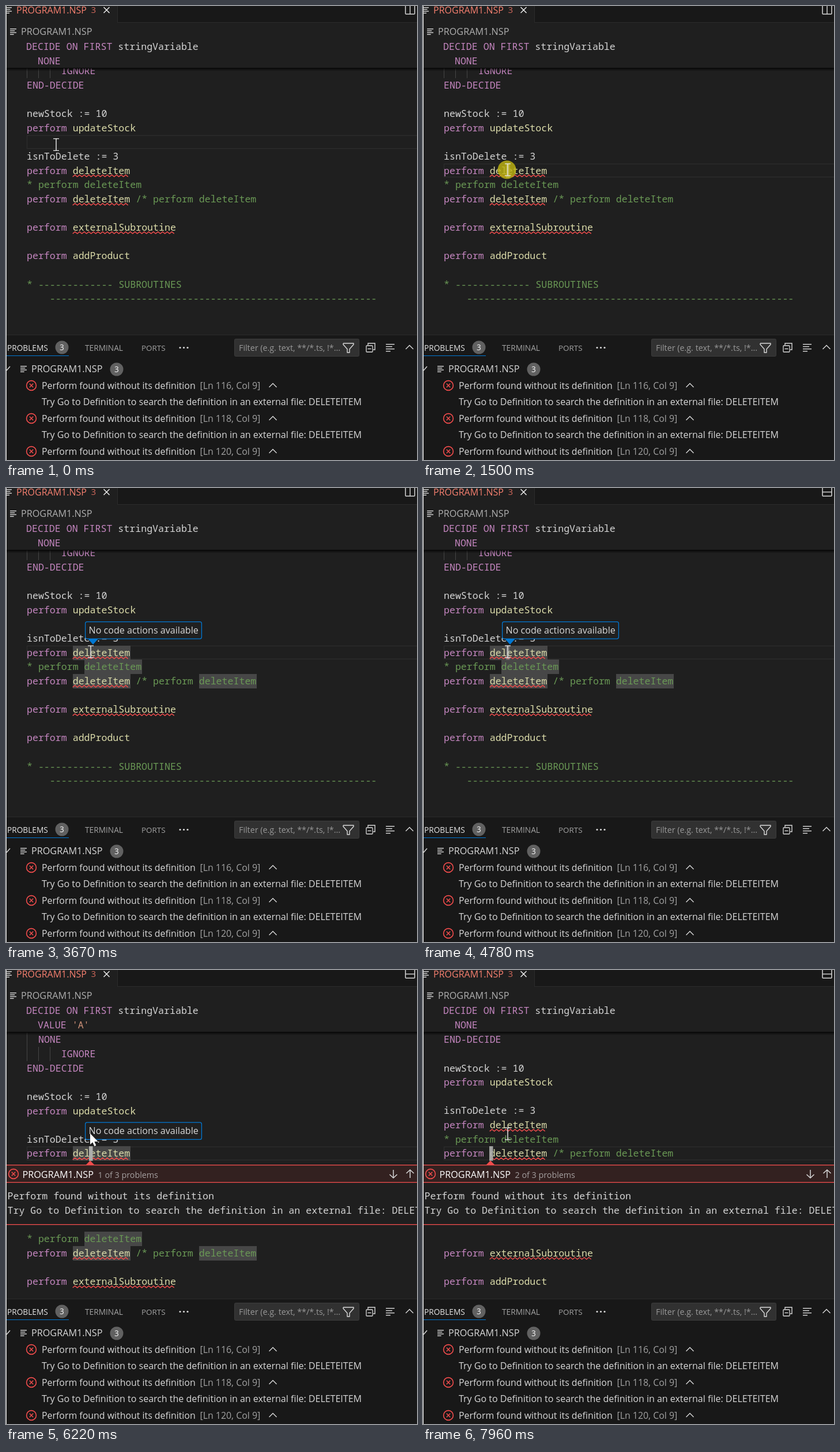
Write an HTML page with a canvas that moves like this. It is 713 px wide and 786 px high and loops after 8000 ms.

```html
<!DOCTYPE html>
<html lang="en">
<head>
<meta charset="utf-8">
<title>Editor quick fix</title>
<style>
  html, body { margin: 0; width: 100%; height: 100%; overflow: hidden; background: #181818; }
  canvas { display: block; }
</style>
</head>
<body>
<canvas id="stage" width="713" height="786"></canvas>
<script>
const ctx = document.getElementById('stage').getContext('2d');
const LOOP = 8000, PITCH = 24.63, CHAR = 9.96, LEFT = 36;
const CLICK = 1430, MARK = 1710, TIP = 2830, ICON = 4710, PEEK = 4850, NEXT = 7300;
const RED = '#f14c4c', GREY = '#d8d8d8', DIM = '#a2a2a2', BLUE = '#0078d4', EDITOR = '#1f1f1f';
const INK = { k: '#c586c0', f: '#dcdcaa', c: '#6a9955', w: '#d4d4d4', s: '#ce9178' };

// Each token starts with its colour key.
const LINES = {
  108: 'w  |kNONE',
  109: 'w      |kIGNORE',
  110: 'kEND-DECIDE',
  112: 'wnewStock := 10',
  113: 'kperform |fupdateStock',
  115: 'wisnToDelete := 3',
  116: 'kperform |fdeleteItem',
  117: 'c* perform deleteItem',
  118: 'kperform |fdeleteItem|c /* perform deleteItem',
  120: 'kperform |fexternalSubroutine',
  122: 'kperform |faddProduct',
  124: 'c* ' + '-'.repeat(13) + ' SUBROUTINES',
  125: 'c    ' + '-'.repeat(57)
};
const WORDS = [[116, 8], [117, 10], [118, 8], [118, 30]];
const ERRORS = [[116, 10], [118, 10], [120, 18]];

const clamp = v => Math.max(0, Math.min(1, v));
const smooth = v => { v = clamp(v); return v * v * (3 - 2 * v); };
const colX = n => LEFT + n * CHAR;

function rect(x, y, w, h, color) {
  ctx.fillStyle = color;
  ctx.fillRect(x, y, w, h);
}
function path(points, color, width = 1.4) {
  ctx.beginPath();
  for (let i = 0; i < points.length; i += 2) ctx.lineTo(points[i], points[i + 1]);
  ctx.strokeStyle = color;
  ctx.lineWidth = width;
  ctx.stroke();
}
function shape(points, color) {
  ctx.beginPath();
  for (let i = 0; i < points.length; i += 2) ctx.lineTo(points[i], points[i + 1]);
  ctx.closePath();
  ctx.fillStyle = color;
  ctx.fill();
}
function disc(x, y, r, color) {
  ctx.beginPath();
  ctx.arc(x, y, r, 0, 7);
  ctx.fillStyle = color;
  ctx.fill();
}
function box(x, y, w, h, r, fill, stroke, width = 1.3) {
  ctx.beginPath();
  ctx.roundRect(x, y, w, h, r);
  if (fill) { ctx.fillStyle = fill; ctx.fill(); }
  ctx.strokeStyle = stroke;
  ctx.lineWidth = width;
  ctx.stroke();
}
function label(s, x, y, color = GREY, size = 15.9) {
  ctx.font = `${size}px "Open Sans", "Noto Sans", sans-serif`;
  ctx.fillStyle = color;
  ctx.fillText(s, x, y + size * 0.35);
}
function code(line, x, y) {
  ctx.font = '500 16.6px "Noto Sans Mono", "DejaVu Sans Mono", monospace';
  for (const token of line.split('|')) {
    ctx.fillStyle = INK[token[0]];
    ctx.fillText(token.slice(1), x, y + 5.6);
    x += (token.length - 1) * CHAR;
  }
}

function listIcon(x, y, w) {
  [w, w * 0.75, w, w * 0.6].forEach((len, i) => rect(x, y - 5 + i * 3.2, len, 1.4, GREY));
}
function errorIcon(x, y) {
  ctx.beginPath();
  ctx.arc(x, y, 8.4, 0, 7);
  ctx.strokeStyle = RED;
  ctx.lineWidth = 1.6;
  ctx.stroke();
  cross(x, y, 3.2, RED);
}
function cross(x, y, r, color) {
  path([x - r, y - r, x + r, y + r], color, 1.5);
  path([x - r, y + r, x + r, y - r], color, 1.5);
}
function badge(x, y) {
  disc(x, y, 11.5, '#616161');
  label('3', x - 4, y, '#f8f8f8', 13.6);
}
const chevron = (x, y) => path([x - 6.5, y + 3, x, y - 3.5, x + 6.5, y + 3], GREY);
function arrow(x, y, dir) {
  path([x, y - 7 * dir, x, y + 7 * dir], GREY, 1.5);
  path([x - 6.5, y + dir, x, y + 7 * dir, x + 6.5, y + dir], GREY, 1.5);
}
function squiggle(x, y, len) {
  const pts = [];
  for (let i = 0; i * 4 <= len; i++) pts.push(x + i * 4, y + (i % 2 ? -1.6 : 1.6));
  path(pts, RED, 1.4);
}

function header(t) {
  rect(1, 0, 712, 108, EDITOR);
  rect(193, 0, 520, 28, '#181818');
  rect(193, 0, 1, 28, '#2b2b2b');
  rect(193, 28, 520, 1, '#2b2b2b');
  listIcon(0, 7, 10);
  label('PROGRAM1.NSP', 18, 7, '#f88070', 16);
  label('3', 147.5, 7, '#d2695c', 15);
  cross(174.5, 7, 5, '#f0f0f0');
  box(693, -2, 16, 16, 1, null, GREY, 1.5);
  if (t < ICON) path([701, 0, 701, 14], GREY);
  else path([693, 7, 709, 7], GREY);
  listIcon(7, 44, 11);
  label('PROGRAM1.NSP', 26, 44, '#b0b0b0', 16.2);

  code('kDECIDE ON FIRST |wstringVariable', 35, 70.5);
  code(t >= PEEK && t < NEXT ? "w  |kVALUE |s'A'" : 'w  |kNONE', 35, 95.5);
  const shade = ctx.createLinearGradient(0, 107, 0, 113);
  shade.addColorStop(0, '#000c');
  shade.addColorStop(1, '#0000');
  rect(1, 107, 712, 6, shade);
}

function panel() {
  rect(1, 569, 712, 217, '#181818');
  rect(1, 569, 712, 1, '#2b2b2b');
  label('PROBLEMS', 2, 592, '#e4e4e4', 13.7);
  rect(1, 605, 108, 1, BLUE);
  badge(97, 591);
  label('TERMINAL', 137, 592, DIM, 13.7);
  label('PORTS', 235, 592, DIM, 13.4);
  for (const x of [302, 308.5, 315]) disc(x, 591.5, 1.6, GREY);

  box(396.5, 576.5, 216, 30, 2, '#313131', '#3c3c3c', 1);
  label('Filter (e.g. text, **/*.ts, !*...', 404, 592, '#989898', 14.3);
  ctx.lineJoin = 'round';
  path([585, 584, 603, 584, 603, 586, 596, 594, 596, 600, 592, 600, 592, 594, 585, 586, 585, 584], GREY);
  ctx.lineJoin = 'miter';
  box(625, 588, 11, 11, 1, null, GREY);
  path([628, 587, 628, 584, 640, 584, 640, 595, 637, 595], GREY);
  path([627.5, 593.5, 633.5, 593.5], GREY);
  [15, 11, 15, 8].forEach((w, i) => rect(659, 585 + i * 4, w, 1.4, GREY));
  chevron(700, 591);

  path([1, 631, 7, 624], GREY);
  listIcon(25, 628, 11);
  label('PROGRAM1.NSP', 44, 628, GREY, 16.2);
  badge(192, 629);
  [116, 118, 120].forEach((n, i) => {
    const y = 657 + i * 57;
    errorIcon(44, y);
    label('Perform found without its definition', 62, y);
    label(`[Ln ${n}, Col 9]`, 336.5, y, DIM);
    chevron(463, y);
    label('Try Go to Definition to search the definition in an external file: DELETEITEM', 62, y + 28.5, GREY, 16);
  });
}

function peekView(index, x) {
  shape([x - 8, 338, x, 330, x + 8, 338], RED);
  rect(1, 337, 712, 104, EDITOR);
  rect(1, 338, 712, 30, '#332120');
  for (const y of [337, 367, 440]) rect(1, y, 712, 1.3, RED);
  errorIcon(13, 353);
  label('PROGRAM1.NSP', 28.5, 354, '#ffffff', 16.2);
  label(`${index} of 3 problems`, 159.5, 354.5, '#a5a0a0', 14.3);
  arrow(672, 353, 1);
  arrow(701, 353, -1);
  code('wPerform found without its definition', 2.5, 391);
  code('wTry Go to Definition to search the definition in an external file: DELETEITEM', 2.5, 416.5);
}

function tooltip(t, shift) {
  ctx.globalAlpha = clamp((t - TIP) / 110);
  if (!shift) shape([142, 261, 160, 261, 151, 271], BLUE);
  box(137.6, 231.6 + shift, 201.8, 29.5, 3, '#202020', BLUE);
  label('No code actions available', 143.5, 246.5 + shift, GREY, 16.1);
  ctx.globalAlpha = 1;
}

function caretAlpha(t) {
  if (t < CLICK || (t >= NEXT && t < 7700)) return 0;
  if (t < 2080) return 1;
  const p = (t - 2080) % 1030;
  return p < 560 ? 1 - smooth(p / 290) : smooth((p - 560) / 210);
}

function mouse(t, peek) {
  if (peek && t < NEXT) {
    shape([146, 283, 146, 302, 150.3, 298.2, 153.3, 305, 156.3, 303.7, 153.4, 297, 159.5, 297], '#ffffff');
    return;
  }
  const k = smooth((t - 450) / 580), x = 87 + 60 * k, y = 240 + 43.5 * k;
  path([x - 5, y - 10.3, x + 5, y - 10.3], '#e4e4e4', 1.3);
  path([x - 5, y + 10.3, x + 5, y + 10.3], '#e4e4e4', 1.3);
  path([x, y - 10.5, x, y + 10.5], '#e4e4e4', 1.5);
}

function draw(t) {
  const peek = t >= PEEK, second = t >= NEXT;
  const current = second ? 118 : t >= CLICK ? 116 : 114;
  const scroll = second ? -16.5 : peek ? 32.8 : 0;
  const lineY = n => 285 + (n - 116) * PITCH + scroll + (peek && n > current ? 5 * PITCH : 0);

  rect(0, 0, 1, 786, '#f0f0f0');
  rect(1, 0, 712, 569, EDITOR);
  box(LEFT + 0.5, lineY(current) - 11.5, 700, 22.6, 0, null, '#2b2b2b', 1.5);
  if (t >= MARK && !second)
    for (const [n, col] of WORDS)
      rect(Math.round(colX(col)), Math.round(lineY(n) - 12.5), 100, 25, '#474747');

  for (const n in LINES) code(LINES[n], LEFT, lineY(+n));
  for (const [n, len] of ERRORS) squiggle(colX(8), lineY(n) + 9, len * CHAR);
  for (const [n, col] of [[108, 0], [109, 0], [109, 2], [109, 4]])
    rect(Math.round(colX(col)), lineY(n) - 12.3, 1, PITCH, '#454545');

  const caretX = second ? 115 : 144;
  ctx.globalAlpha = caretAlpha(t);
  rect(caretX, lineY(current) - 12.7, 6.5, 25.3, '#aeafad');
  ctx.globalAlpha = 1;

  if (peek) peekView(second ? 2 : 1, caretX + 2);
  header(t);
  panel();
  if (t >= TIP && !second) tooltip(t, peek ? 32.3 : 0);
  if (t >= CLICK && t < MARK) disc(145.5, 283.5, 16, 'rgba(190,178,18,.82)');
  mouse(t, peek);
}

const start = performance.now();
function tick() {
  draw((performance.now() - start) % LOOP);
  requestAnimationFrame(tick);
}
tick();
</script>
</body>
</html>
```
